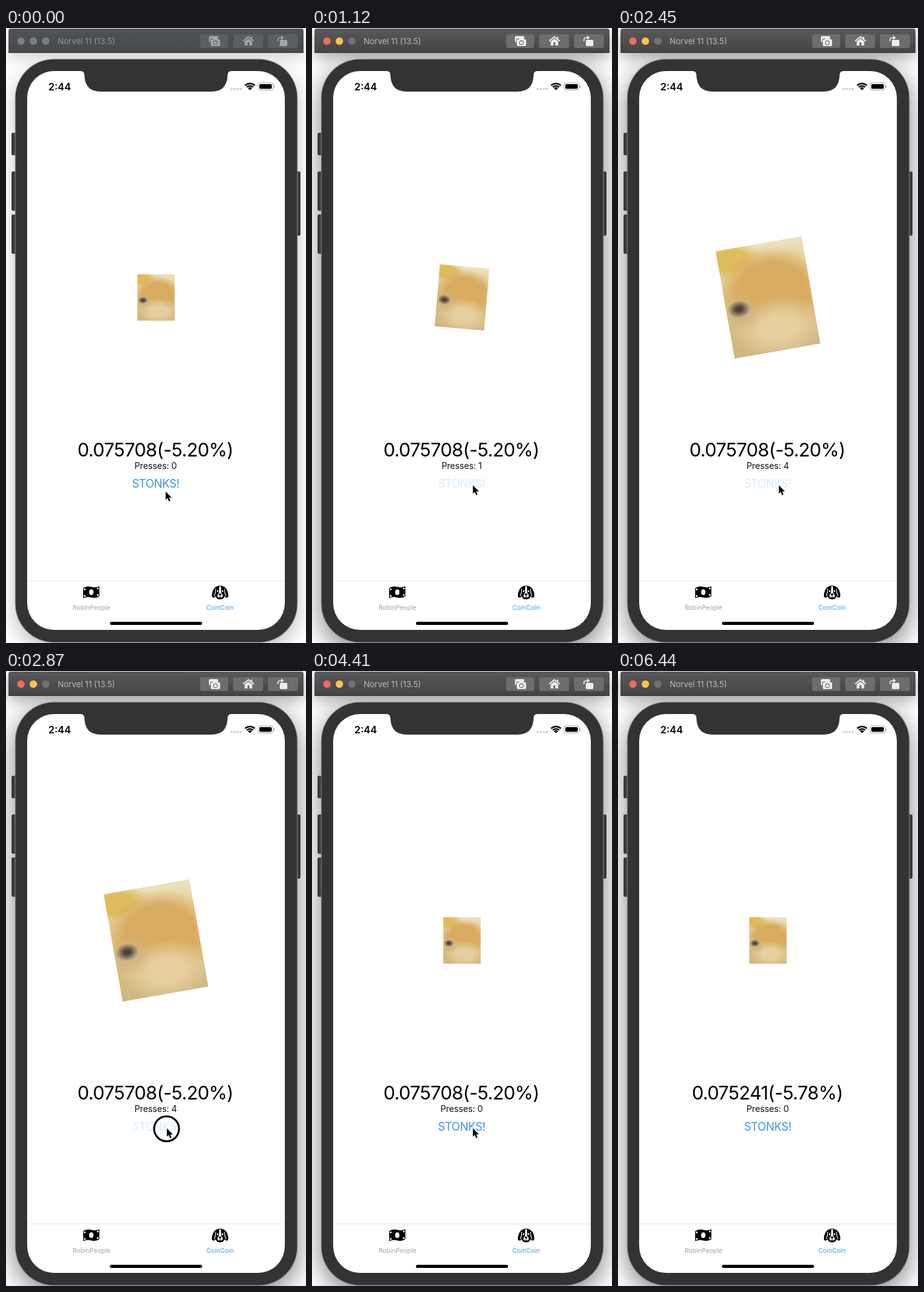
Recreate the animation shown at these times as an HTML page with a canvas. Size 482 by 986 pixels, loop 6.51 s.

```html
<!DOCTYPE html>
<html lang="en">
<head>
<meta charset="utf-8">
<title>Coin presses</title>
<style>
  html, body { margin: 0; width: 100%; height: 100%; overflow: hidden; background: #fff; }
  canvas { display: block; width: 482px; height: 986px; }
</style>
</head>
<body>
<canvas id="stage" width="482" height="986"></canvas>
<script>
const ctx = document.getElementById('stage').getContext('2d');
const LOOP = 6510, STEP = 70;
const ACTIVE_AT = 840, PRICE_AT = 4480;
const BLUE = '#3f94d9';
const presses = [[910, 1120], [1400, 1540], [1890, 2030], [2310, 2450], [2800, 2940]];
const angles = [0, 5, -5, 10, -10];
const cursorPath = [
  [0, 256, 743], [350, 258, 733], [5110, 258, 733],
  [5530, 270, 764], [5740, 292, 950], [5880, 300, 1000], [LOOP, 300, 1000]
];

function box(x, y, w, h, r, fill) {
  ctx.beginPath();
  ctx.roundRect(x, y, w, h, r);
  ctx.fillStyle = fill;
  ctx.fill();
}

function disc(x, y, rx, ry, fill, turn = 0) {
  ctx.beginPath();
  ctx.ellipse(x, y, rx, ry, turn, 0, 7);
  ctx.fillStyle = fill;
  ctx.fill();
}

function shape(path, fill) {
  ctx.fillStyle = fill;
  ctx.fill(new Path2D(path));
}

function line(path, color, width) {
  ctx.strokeStyle = color;
  ctx.lineWidth = width;
  ctx.stroke(new Path2D(path));
}

function text(str, x, y, size, fill, { weight = 400, align = 'center', track = 0 } = {}) {
  ctx.font = `${weight} ${size}px Inter, "Liberation Sans", sans-serif`;
  ctx.letterSpacing = track * size + 'px';
  ctx.textAlign = align;
  ctx.fillStyle = fill;
  ctx.fillText(str, x, y);
}

function vertical(y0, y1, ...colors) {
  const g = ctx.createLinearGradient(0, y0, 0, y1);
  colors.forEach((c, i) => g.addColorStop(i / (colors.length - 1), c));
  return g;
}

function drawTitleBar(active) {
  const fill = active ? vertical(1, 40, '#59595b', '#444446') : vertical(1, 40, '#505355', '#474a4c');
  box(4, 1, 474, 39, [5, 5, 0, 0], fill);
  box(4, 39, 474, 1, 0, '#303032');
  const lights = active ? ['#ee6b60', '#f6c351', '#717173'] : ['#7b7d7e', '#7b7d7e', '#7b7d7e'];
  lights.forEach((c, i) => disc(24 + i * 20, 21, 6, 6, c));
  text('Norvel 11 (13.5)', 83, 26, 13, active ? '#b9b9bb' : '#929496', { align: 'left' });

  const button = active ? '#6d6d6f' : '#5c5f61';
  const ink = active ? '#ececec' : '#a2a4a5';
  [[312, 45], [365, 48], [421, 48]].forEach(([x, w]) => box(x, 10, w, 22, 3, button));

  // camera
  box(326, 13, 15, 10, 2, ink);
  box(328, 17, 17, 13, 2, button);
  box(329, 18, 15, 11, 2, ink);
  box(333, 16, 7, 4, 1, ink);
  disc(336.5, 23.5, 3.7, 3.7, button);
  disc(336.5, 23.5, 2.6, 2.6, ink);
  // home
  line('M381 21L389.500 14L398 21M394.500 14V18', ink, 2);
  shape('M383.500 21.500L389.500 17L395.500 21.500V28H383.500Z', ink);
  box(388, 23, 3, 5, 0, button);
  // rotate
  box(440, 19, 12, 10, 1.5, ink);
  line('M437 21C436 16 439 15.500 443 15.500', ink, 1.6);
  shape('M442 12L446.500 15.500L442 19Z', ink);
}

function drawPhone(active) {
  ctx.save();
  ctx.shadowColor = `rgba(0,0,0,${active ? 0.5 : 0.25})`;
  ctx.shadowBlur = active ? 42 : 30;
  ctx.shadowOffsetY = 12;
  box(15, 50, 453, 935, 62, '#333');
  ctx.shadowBlur = 24;
  ctx.shadowOffsetY = 6;
  ctx.shadowColor = `rgba(0,0,0,${active ? 0.35 : 0.18})`;
  box(4, 1, 474, 39, 4, '#48484a');
  ctx.restore();

  [[9, 168, 36], [9, 230, 63], [9, 299, 63], [465, 230, 103]].forEach(([x, y, h]) => {
    box(x, y, 8, h, 2, '#3d3d3d');
    box(x < 100 ? x : x + 7, y + 2, 1, h - 4, 0, '#222');
  });
  box(14.5, 49.5, 454, 936, 62.5, '#858585');
  box(15.5, 50.5, 452, 934, 61.5, '#333');
  box(34, 69, 414, 896, 43, '#fff');
  shape('M120 69Q126 69 126 76Q127 102 152 102H330Q355 102 356 76Q356 69 362 69V67H120Z', '#333');
}

function drawStatus() {
  text('2:44', 68, 99.5, 16, '#000', { weight: 600, align: 'left' });
  for (let i = 0; i < 4; i++) box(361 + i * 4.8, 96, 3.5, 3.5, 1, '#d2d2d2');
  const arc = (r, w) => {
    ctx.beginPath();
    ctx.arc(392, 100, r, -Math.PI * 0.75, -Math.PI * 0.25);
    ctx.strokeStyle = '#000';
    ctx.lineWidth = w;
    ctx.stroke();
  };
  arc(11, 2.4);
  arc(7.2, 2.3);
  shape('M392 99.800L388.700 96.400Q392 93.700 395.300 96.400Z', '#000');
  box(404.5, 87.5, 25, 12.5, 4, '#a8a8a8');
  box(405.5, 88.5, 23, 10.5, 3, '#fff');
  box(407, 90, 20, 7.5, 2, '#000');
  box(430, 92, 1.5, 4, 1, '#a8a8a8');
}

function blob(x, y, rx, ry, rgb, core = 0.5) {
  ctx.save();
  ctx.translate(x, y);
  ctx.scale(rx, ry);
  const g = ctx.createRadialGradient(0, 0, core, 0, 0, 1);
  g.addColorStop(0, `rgb(${rgb})`);
  g.addColorStop(1, `rgba(${rgb},0)`);
  disc(0, 0, 1, 1, g);
  ctx.restore();
}

// Soft tonal stand-in for the photo, on a 60 by 75 sheet
function drawPhoto(count) {
  const scale = (60 + 20 * count) / 60;
  ctx.save();
  ctx.translate(241, 432);
  ctx.rotate(angles[count] * Math.PI / 180);
  ctx.scale(scale, scale);
  ctx.translate(-30, -37.5);
  ctx.beginPath();
  ctx.rect(0, 0, 60, 75);
  ctx.clip();
  box(0, 0, 60, 75, 0, vertical(0, 75, '#ece2bf', '#dfc07b', '#cfb685'));
  blob(8, 8, 22, 13, '222,187,92');
  blob(33, 34, 37, 31, '217,171,96', 0.65);
  blob(34, 59, 32, 21, '229,207,158', 0.4);
  blob(10, 44, 14, 13, '205,183,139', 0.3);
  blob(9, 42, 8, 6, '78,65,55', 0.25);
  ctx.restore();
}

function drawTabs() {
  box(34, 886, 414, 1, 0, '#e7e7e7');
  // banknote
  shape('M124 898Q130 894 137 896Q144 898 150 895V911Q144 915 137 913Q130 911 124 914Z', '#000');
  disc(137, 904.5, 3.5, 4.6, '#fff');
  [[126.500, 900], [147.500, 898.500], [126.500, 910.500], [147.500, 909]]
    .forEach(([x, y]) => disc(x, y, 1.5, 1.5, '#fff'));
  // dog
  shape('M337 896Q344 892 351 896L354 899Q358 906 357 912Q354 915 351 911Q350 916 344 916Q338 916 337 911Q334 915 331 912Q330 906 334 899Z', '#000');
  line('M337 899Q337 906 334.500 911M351 899Q351 906 353.500 911', '#fff', 1.1);
  shape('M342.800 895H345.200L346 906Q349 909 348 912Q346 914 344 912Q342 914 340 912Q339 909 342 906Z', '#fff');
  disc(344, 908, 2.2, 1.6, '#000');
  box(343.5, 908, 1, 4, 0, '#000');
  disc(340, 903, 1.2, 1.4, '#fff');
  disc(348, 903, 1.2, 1.4, '#fff');
  text('RobinPeople', 137.5, 932.5, 10, '#a3a3a3', { track: 0.012 });
  text('CoinCoin', 344, 932.5, 10, '#4b9dd6', { track: 0.01 });
  box(167, 952, 148, 5, 2.5, '#000');
}

function buttonAlpha(t) {
  const press = presses.findLast(([down]) => t >= down);
  if (!press) return 1;
  const [down, up] = press;
  const ease = p => p < 0.5 ? 2 * p * p : 1 - 2 * (1 - p) ** 2;
  if (t < up) return 1 - 0.82 * ease(Math.min(1, (t - down + STEP) / 140));
  return 0.18 + 0.82 * ease(Math.min(1, (t - up) / 250));
}

function drawCursor(t) {
  const i = cursorPath.findIndex(([time]) => time > t);
  const [t0, x0, y0] = cursorPath[i - 1], [t1, x1, y1] = cursorPath[i];
  const p = (t - t0) / (t1 - t0);
  ctx.save();
  ctx.translate(x0 + (x1 - x0) * p, y0 + (y1 - y0) * p);
  const arrow = 'M0.500 0V13.500L3.500 10.700L5.700 16L8 15L5.800 9.900H10Z';
  line(arrow, '#fff', 2);
  shape(arrow, '#000');
  ctx.restore();
}

function draw(t) {
  const active = t >= ACTIVE_AT;
  const count = presses.filter(([, up]) => t >= up).length % 5;
  ctx.fillStyle = '#fff';
  ctx.fillRect(0, 0, 482, 986);
  drawPhone(active);
  drawTitleBar(active);
  drawStatus();
  drawPhoto(count);
  text(t < PRICE_AT ? '0.075708(-5.20%)' : '0.075241(-5.78%)', 240, 686.5, 30, '#000', { track: -0.022 });
  text('Presses: ' + count, 240.5, 707, 14, '#111', { track: -0.01 });
  ctx.globalAlpha = buttonAlpha(t);
  text('STONKS!', 240.5, 736.5, 18, BLUE, { track: -0.018 });
  ctx.globalAlpha = 1;
  drawTabs();
  if (presses.some(([down, up]) => t >= down && t < up)) {
    ctx.beginPath();
    ctx.arc(258, 734, 20, 0, 7);
    ctx.strokeStyle = '#000';
    ctx.lineWidth = 3;
    ctx.stroke();
  }
  drawCursor(t);
}

const start = performance.now();
function tick() {
  const t = (performance.now() - start) % LOOP;
  draw(Math.floor(t / STEP) * STEP);
  requestAnimationFrame(tick);
}
tick();
</script>
</body>
</html>
```
